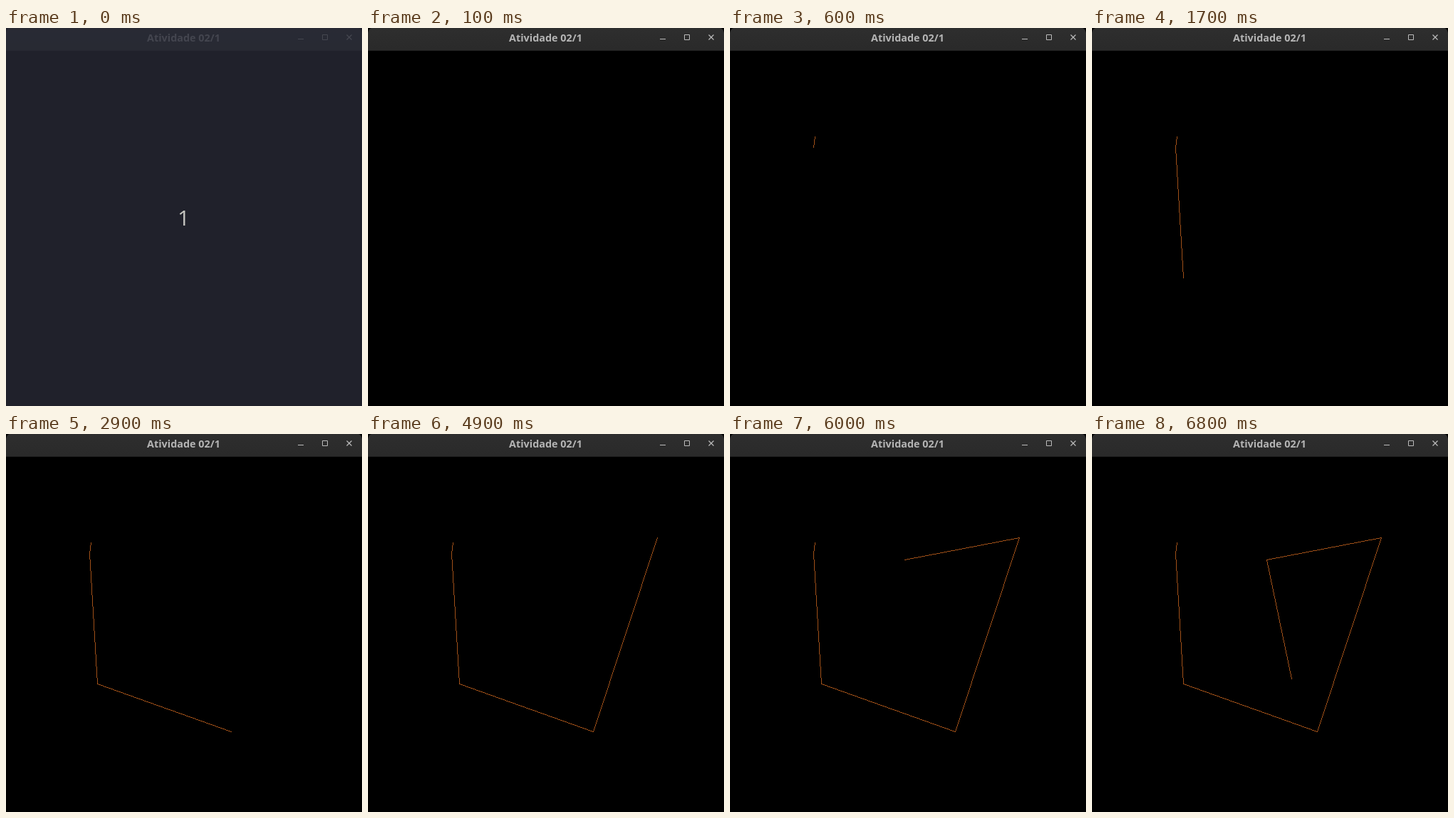
Animation, 500 px wide and 530 px high, one loop 8000 ms. Source, as an HTML page with a canvas:

```html
<!DOCTYPE html>
<html lang="pt">
<head>
<meta charset="utf-8">
<title>Atividade 02/1</title>
<style>
  html, body { margin: 0; width: 100%; height: 100%; overflow: hidden; background: #000; }
  canvas, svg { position: absolute; left: 0; top: 0; width: 500px; height: 530px; }
  text { font-family: "Open Sans", "Noto Sans", sans-serif; text-anchor: middle; }
  .title { font-size: 14.4px; font-weight: 700; fill: #b4b4b4; }
  .icon { fill: none; stroke: #bcbcbc; }
  #intro { opacity: .8; }
  #intro text { font-size: 30px; fill: #f8f8f2; }
</style>
</head>
<body>
<canvas id="board" width="500" height="530"></canvas>
<svg viewBox="0 0 500 530">
  <defs>
    <linearGradient id="bar" x2="0" y2="1">
      <stop stop-color="#2e2e2e"/>
      <stop offset="1" stop-color="#2a2a2a"/>
    </linearGradient>
  </defs>
  <path d="M0 31V7Q1 1 5 0H495Q499 1 500 7V31Z" fill="url(#bar)"/>
  <path d="M0 31h500v1H0z" fill="#232323"/>
  <text class="title" x="249.5" y="19">Atividade 02/1</text>
  <path class="icon" d="M410 15.5h8M444.5 9.5h7v7h-7z"/>
  <path class="icon" d="M478.5 9.5l7 7m0-7l-7 7" stroke-width="1.2"/>
  <g id="intro">
    <path d="M0 0h500v530H0z" fill="#282a36"/>
    <text x="249.5" y="276.5">1</text>
  </g>
</svg>
<script>
const LOOP = 8000, INTRO_END = 100;
const start = [119, 152];
// time at which the stroke reaches each click point: [ms, x, y]
const clicks = [
  [600, 117, 167], [1700, 128, 350], [2900, 316, 417],
  [4900, 406, 145], [6000, 245, 176], [6800, 280, 343]
];
const intro = document.getElementById('intro');
const ctx = document.getElementById('board').getContext('2d');
ctx.fillStyle = '#a05018';

// one-pixel line without antialiasing
function line([x0, y0], [x1, y1]) {
  const dx = x1 - x0, dy = y1 - y0;
  const n = Math.max(Math.abs(dx), Math.abs(dy));
  for (let i = 0; i <= n; i++) {
    ctx.fillRect(Math.round(x0 + dx * i / n), Math.round(y0 + dy * i / n), 1, 1);
  }
}

let shown = -1;
function draw(now) {
  const t = now % LOOP;
  intro.style.display = t < INTRO_END ? '' : 'none';
  const count = clicks.filter(c => t >= c[0]).length;
  if (count !== shown) {
    ctx.clearRect(0, 0, 500, 530);
    let from = start;
    for (const [, ...to] of clicks.slice(0, count)) {
      line(from, to);
      from = to;
    }
    shown = count;
  }
}

let origin;
function tick(now) {
  origin ??= now;
  draw(now - origin);
  requestAnimationFrame(tick);
}
draw(0);
requestAnimationFrame(tick);
</script>
</body>
</html>
```
